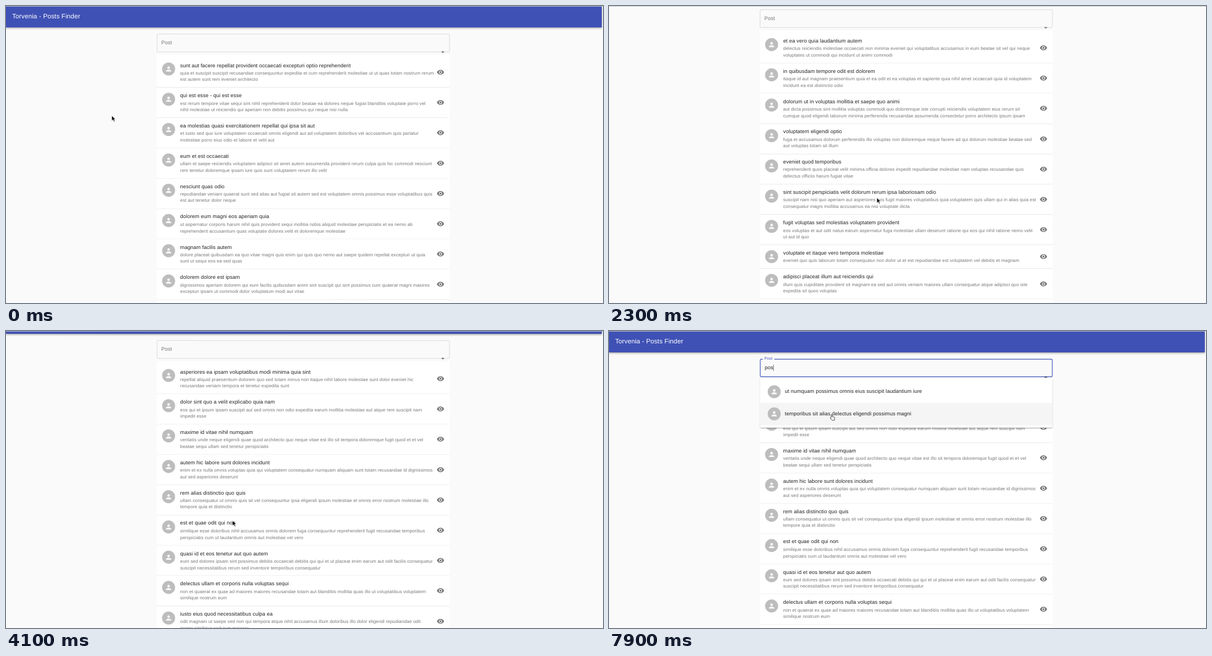
Write an HTML page that moves like this. It is 1061 by 528 pixels and loops after 8000 ms.

```html
<!DOCTYPE html>
<html lang="en">
<head>
<meta charset="utf-8">
<title>Posts Finder</title>
<style>
  html, body { margin: 0; width: 100%; height: 100%; overflow: hidden; background: #fafafa; }
  body { position: relative; font: 16px/24px "Liberation Sans", Arial, sans-serif; letter-spacing: .00938em;
    color: rgba(0,0,0,.87); text-rendering: geometricPrecision; white-space: nowrap; }
  [hidden] { display: none !important; }
  svg { display: block; fill: currentColor; }
  #edge { position: absolute; inset: 0 0 auto; height: .6px; background: #c4c4c4; }
  /* The hair of rotation keeps text baselines from snapping to whole pixels. */
  #view { position: absolute; left: 0; top: .5px; transform: rotate(.002deg) scale(.578); transform-origin: 0 0; }
  #page { position: relative; width: 1832px; }
  header { position: absolute; width: 100%; height: 64px; background: #3f51b5; color: #fff;
    font-size: 20px; line-height: 61px; letter-spacing: .0075em; text-indent: 19px;
    box-shadow: 0 2px 4px -1px rgba(0,0,0,.2), 0 4px 5px rgba(0,0,0,.14), 0 1px 10px rgba(0,0,0,.12); }
  main { position: absolute; left: 463.7px; top: 0; width: 900px; }
  main > * { position: absolute; }

  #box { top: 84px; left: 0; width: 900px; height: 56px; box-sizing: border-box; border-radius: 4px;
    border: 1px solid rgba(0,0,0,.23); }
  #box.hover { border-color: rgba(0,0,0,.87); }
  #box.focus { border: 2px solid #3f51b5; }
  #notch { top: 83px; left: 9px; width: 35px; height: 4px; background: #fafafa; }
  #label { left: 14px; top: 83.5px; line-height: 16px; transform-origin: 0 0; color: rgba(0,0,0,.54); }
  #label.focus { color: #3f51b5; }
  #input { left: 15px; top: 99.5px; height: 24px; display: flex; align-items: center; }
  #caret { width: 1.4px; height: 19px; background: #111; }
  #arrow { left: 867px; top: 128px; width: 24px; color: rgba(0,0,0,.54); }

  #list { top: 148px; width: 900px; }
  .posts { background: #fff; padding: 8px 0; }
  .post { position: relative; padding: 13.5px 0 14.5px 72px; border-bottom: 1px solid rgba(0,0,0,.12); }
  .post p { margin: 0; font-size: 14px; line-height: 20.1px; letter-spacing: .01071em; color: rgba(0,0,0,.54); }
  .avatar { position: absolute; left: 16px; top: 16px; width: 40px; height: 40px; border-radius: 50%;
    background: #bdbdbd; color: #fafafa; }
  .avatar svg { width: 24px; margin: 8px; }
  .eye { position: absolute; right: 16px; top: 50%; width: 24px; margin-top: -12px; color: rgba(0,0,0,.54); }

  nav { display: flex; justify-content: center; margin-top: -.5px; font-size: 14px; line-height: 32px; letter-spacing: .01071em; }
  nav span { position: relative; width: 32px; height: 32px; margin: 0 3px; border-radius: 50%; text-align: center; }
  nav svg { width: 20px; margin: 6px; }
  nav .hover { background: #ebebeb; }
  nav .press { background: radial-gradient(circle at 50% 58%, #bcbcbc 11px, #dedede 13px); }
  nav .on { background: #3f51b5; color: #fff; }

  #popup { top: 143px; width: 900px; max-height: 366px; box-sizing: border-box; padding: 8px 0; overflow: hidden;
    background: #fff; border-radius: 4px;
    box-shadow: 0 2px 1px -1px rgba(0,0,0,.2), 0 1px 1px rgba(0,0,0,.14), 0 1px 3px rgba(0,0,0,.2); }
  .option { position: relative; height: 68.3px; line-height: 68.3px; padding-left: 77px; }
  .option.hover { background: #f5f5f5; }
  .option .avatar { left: 24px; top: 14px; }

  #cursor { position: absolute; left: 0; top: 0; width: 24px; height: 24px; overflow: visible; transform-origin: 0 0; }
</style>
</head>
<body>
<div id="view">
  <div id="page">
    <header>Torvenia - Posts Finder</header>
    <main>
      <div id="box"></div>
      <div id="notch"></div>
      <div id="label">Post</div>
      <div id="input"><span id="typed"></span><span id="caret"></span></div>
      <svg id="arrow" viewBox="0 0 24 24"><path d="M7 10l5 5 5-5z"/></svg>
      <div id="list"><nav></nav></div>
      <div id="popup"></div>
    </main>
  </div>
</div>
<div id="edge"></div>
<svg id="cursor" viewBox="0 0 24 24">
  <path id="pointer" d="M0 0v16l4-3.6 3 6 2.6-1.2-3-5.8h5z" fill="#111" stroke="#fff" stroke-width="1"/>
  <path id="hand" d="M1 0c1.2 0 1.7.8 1.7 1.7V6.5l6 1.2c1.5.4 2.3 1.2 2.3 2.6l-1.6 7.2H2.4l-5.2-6c-.9-1.3.6-2.5 1.8-1.6l.4.5V1.7C-.6.8 0 0 1 0z" fill="#fff" stroke="#111" stroke-width="1.3"/>
  <path id="beam" d="M-3.5-8.5Q0-8.5 0-7Q0-8.5 3.5-8.5M0-7V7M-3.5 8.5Q0 8.5 0 7Q0 8.5 3.5 8.5" fill="none" stroke="#222" stroke-width="1.7"/>
</svg>

<script>
// One post per row: title | first line | second line. Blank rows part the pages.
const POSTS = `sunt aut facere repellat provident occaecati excepturi optio reprehenderit|quia et suscipit suscipit recusandae consequuntur expedita et cum reprehenderit molestiae ut ut quas totam nostrum rerum|est autem sunt rem eveniet architecto
qui est esse - qui est esse|est rerum tempore vitae sequi sint nihil reprehenderit dolor beatae ea dolores neque fugiat blanditiis voluptate porro vel|nihil molestiae ut reiciendis qui aperiam non debitis possimus qui neque nisi nulla
ea molestias quasi exercitationem repellat qui ipsa sit aut|et iusto sed quo iure voluptatem occaecati omnis eligendi aut ad voluptatem doloribus vel accusantium quis pariatur|molestiae porro eius odio et labore et velit aut
eum et est occaecati|ullam et saepe reiciendis voluptatem adipisci sit amet autem assumenda provident rerum culpa quis hic commodi nesciunt|rem tenetur doloremque ipsam iure quis sunt voluptatem rerum illo velit
nesciunt quas odio|repudiandae veniam quaerat sunt sed alias aut fugiat sit autem sed est voluptatem omnis possimus esse voluptatibus quis|est aut tenetur dolor neque
dolorem eum magni eos aperiam quia|ut aspernatur corporis harum nihil quis provident sequi mollitia nobis aliquid molestiae perspiciatis et ea nemo ab|reprehenderit accusantium quas voluptate dolores velit et doloremque molestiae
magnam facilis autem|dolore placeat quibusdam ea quo vitae magni quis enim qui quis quo nemo aut saepe quidem repellat excepturi ut quia|sunt ut sequi eos ea sed quas
dolorem dolore est ipsam|dignissimos aperiam dolorem qui eum facilis quibusdam animi sint suscipit qui sint possimus cum quaerat magni maiores|excepturi ipsam ut commodi dolor voluptatum modi aut vitae
nesciunt iure omnis dolorem tempora et accusantium|consectetur animi nesciunt iure dolore enim quia ad veniam autem ut quam aut nobis et est aut quod aut|provident voluptas autem voluptas
optio molestias id quia eum|quo et expedita modi cum officia vel magni doloribus qui repudiandae vero nisi sit quos veniam quod sed accusamus|veritatis error

et ea vero quia laudantium autem|delectus reiciendis molestiae occaecati non minima eveniet qui voluptatibus accusamus in eum beatae sit vel qui neque|voluptates ut commodi qui incidunt ut animi commodi
in quibusdam tempore odit est dolorem|itaque id aut magnam praesentium quia et ea odit et ea voluptas et sapiente quia nihil amet occaecati quia id voluptatem|incidunt ea est distinctio odio
dolorum ut in voluptas mollitia et saepe quo animi|aut dicta possimus sint mollitia voluptas commodi quo doloremque iste corrupti reiciendis voluptatem eius rerum sit|cumque quod eligendi laborum minima perferendis recusandae assumenda consectetur porro architecto ipsum ipsam
voluptatem eligendi optio|fuga et accusamus dolorum perferendis illo voluptas non doloremque neque facere ad qui dolorum molestiae beatae sed|aut voluptas totam sit illum
eveniet quod temporibus|reprehenderit quos placeat velit minima officia dolores impedit repudiandae molestiae nam voluptas recusandae quis|delectus officiis harum fugiat vitae
sint suscipit perspiciatis velit dolorum rerum ipsa laboriosam odio|suscipit nam nisi quo aperiam aut asperiores eos fugit maiores voluptatibus quia voluptatem quis ullam qui in alias quia est|consequatur magni mollitia accusamus ea nisi voluptate dicta
fugit voluptas sed molestias voluptatem provident|eos voluptas et aut odit natus earum aspernatur fuga molestiae ullam deserunt ratione qui eos qui nihil ratione nemo velit|ut aut id quo
voluptate et itaque vero tempora molestiae|eveniet quo quis laborum totam consequatur non dolor ut et est repudiandae est voluptatem vel debitis et magnam
adipisci placeat illum aut reiciendis qui|illum quis cupiditate provident sit magnam ea sed aut omnis veniam maiores ullam consequatur atque adipisci quo iste|expedita sit quos voluptas
doloribus ad provident suscipit at|qui consequuntur ducimus possimus quisquam amet similique suscipit porro ipsam amet eos veritatis officiis|exercitationem vel fugit aut necessitatibus totam omnis rerum consequatur expedita quidem cumque explicabo

asperiores ea ipsam voluptatibus modi minima quia sint|repellat aliquid praesentium dolorem quo sed totam minus non itaque nihil labore molestiae sunt dolor eveniet hic|recusandae veniam tempora et tenetur expedita sunt
dolor sint quo a velit explicabo quia nam|eos qui et ipsum ipsam suscipit aut sed omnis non odio expedita earum mollitia molestiae aut atque rem suscipit nam|impedit esse
maxime id vitae nihil numquam|veritatis unde neque eligendi quae quod architecto quo neque vitae est illo sit tempora doloremque fugit quod et et vel|beatae sequi ullam sed tenetur perspiciatis
autem hic labore sunt dolores incidunt|enim et ex nulla omnis voluptas quia qui voluptatem consequatur numquam aliquam sunt totam recusandae id dignissimos|aut sed asperiores deserunt
rem alias distinctio quo quis|ullam consequatur ut omnis quis sit vel consequuntur ipsa eligendi ipsum molestiae et omnis error nostrum molestiae illo|tempore quia et distinctio
est et quae odit qui non|similique esse doloribus nihil accusamus omnis dolorem fuga consequuntur reprehenderit fugit recusandae temporibus|perspiciatis cum ut laudantium omnis aut molestiae vel vero
quasi id et eos tenetur aut quo autem|eum sed dolores ipsam sint possimus debitis occaecati debitis qui qui et ut placeat enim earum aut odit facilis consequatur|suscipit necessitatibus rerum sed inventore temporibus consequatur
delectus ullam et corporis nulla voluptas sequi|non et quaerat ex quae ad maiores maiores recusandae totam aut blanditiis mollitia quas illo ut voluptatibus voluptatem|similique nostrum eum
iusto eius quod necessitatibus culpa ea|odit magnam ut saepe sed non qui tempora atque nihil accusamus illum doloribus illo dolor eligendi repudiandae odit|magni similique sed cum maiores
a quo magni similique perferendis|alias dolor cumque impedit blanditiis non eveniet odio maxime blanditiis amet eius quis tempora quia autem rem a|provident perspiciatis quia`;
const MORE = ['ut numquam possimus omnis eius suscipit laudantium iure', 'temporibus sit alias delectus eligendi possimus magni'];

const $ = id => document.getElementById(id);
const icon = (d, cls = '') => `<svg class="${cls}" viewBox="0 0 24 24"><path d="${d}"/></svg>`;
const avatar = `<div class="avatar">${icon('M12 12c2.21 0 4-1.79 4-4s-1.79-4-4-4-4 1.79-4 4 1.79 4 4 4zm0 2c-2.67 0-8 1.34-8 4v2h16v-2c0-2.66-5.33-4-8-4z')}</div>`;
const eye = icon('M12 4.5C7 4.5 2.73 7.61 1 12c1.73 4.39 6 7.5 11 7.5s9.27-3.11 11-7.5c-1.73-4.39-6-7.5-11-7.5zM12 17c-2.76 0-5-2.24-5-5s2.24-5 5-5 5 2.24 5 5-2.24 5-5 5zm0-8c-1.66 0-3 1.34-3 3s1.34 3 3 3 3-1.34 3-3-1.34-3-3-3z', 'eye');

const pages = POSTS.split('\n\n').map(p => p.split('\n').map(row => row.split('|')));
const nav = document.querySelector('nav');
const lists = pages.map(rows => {
  const el = document.createElement('div');
  el.className = 'posts';
  el.innerHTML = rows.map(([title, ...lines]) =>
    `<div class="post">${avatar}${title}<p>${lines.join('<br>')}</p>${eye}</div>`).join('');
  nav.before(el);
  return el;
});
nav.innerHTML = [icon('M15.41 7.41L14 6l-6 6 6 6 1.41-1.41L10.83 12z'), 1, 2, 3, 4, 5, '…', 10,
  icon('M10 6L8.59 7.41 13.17 12l-4.58 4.59L10 18l6-6z')].map(x => `<span>${x}</span>`).join('');
const buttons = [...nav.children];

const titles = [...pages.flat().map(p => p[0]), ...MORE];
$('popup').innerHTML = titles.map(x => `<div class="option">${avatar}${x}</div>`).join('');
const options = [...$('popup').children];

// Keys are [time, ...values], joined linearly.
const SCROLL = [[400, 0], [500, 233.4], [1500, 233.4], [1600, 213.3], [2100, 213.3], [2200, 160], [2300, 75], [2400, 10],
  [2500, 0], [2700, 0], [2800, 100], [2900, 213.3], [3800, 213.3], [3900, 185], [4000, 128], [4100, 57], [4200, 0]];
const CURSOR = [[0, 188, 195], [500, 430, 330], [900, 533, 477], [1300, 487, 513], [1800, 487, 513], [2300, 476, 341],
  [2800, 476, 341], [3000, 482, 455], [3300, 508, 512], [3500, 508, 512], [4000, 402.5, 337], [4300, 402.5, 337],
  [4900, 349.5, 67], [5100, 349.5, 67], [5200, 350.5, 67], [7400, 350.5, 67], [7800, 395, 148.5]];

function sample(keys, t) {
  const i = keys.findIndex(k => k[0] > t);
  if (i < 0) return keys[keys.length - 1].slice(1);
  if (!i) return keys[0].slice(1);
  const a = keys[i - 1], b = keys[i], f = (t - a[0]) / (b[0] - a[0]);
  return a.slice(1).map((v, j) => v + (b[j + 1] - v) * f);
}

function draw(t) {
  const pageAt = (second, third) => t < second ? 0 : t < third ? 1 : 2;
  const shown = pageAt(1600, 3400), selected = pageAt(1800, 3500) + 1;
  lists.forEach((el, i) => el.hidden = i !== shown);
  $('page').style.transform = `translateY(${-sample(SCROLL, t)[0]}px)`;

  const [x, y] = sample(CURSOR, t);
  const onNav = y > 498;
  const kind = onNav || t >= 7600 ? 'hand' : t >= 4900 ? 'beam' : 'pointer';
  for (const k of ['pointer', 'hand', 'beam']) $(k).style.display = k === kind ? '' : 'none';
  $('cursor').style.transform = `translate(${x}px, ${y}px) scale(.578)`;

  buttons.forEach((b, i) => {
    const over = onNav && Math.abs(x - 440 - i * 22) < 10;
    const press = over && (t >= 1600 && t < 1800 || t === 3400);
    b.className = i === selected ? 'on' : press ? 'press' : over ? 'hover' : '';
  });

  const focus = t >= 5700;
  const shrink = Math.min(1, Math.max(0, (t - 5600) / 200));
  $('box').className = focus ? 'focus' : t >= 4900 ? 'hover' : '';
  $('label').className = focus ? 'focus' : '';
  $('label').style.transform = `translateY(${20 - 26 * shrink}px) scale(${1 - .25 * shrink})`;
  $('notch').hidden = $('input').hidden = $('popup').hidden = !focus;
  $('arrow').style.transform = focus ? 'rotate(180deg)' : '';

  const query = 'pos'.slice(0, Math.max(0, Math.floor((t - 6700) / 100)));
  $('typed').textContent = query;
  options.forEach((el, i) => {
    el.hidden = !titles[i].includes(query);
    el.classList.toggle('hover', t >= 7700 && i === titles.length - 1);
  });
}

let last = -1;
function tick() {
  const t = Math.floor(performance.now() % 8000 / 100) * 100;
  if (t !== last) draw(last = t);
  requestAnimationFrame(tick);
}
tick();
</script>
</body>
</html>
```
